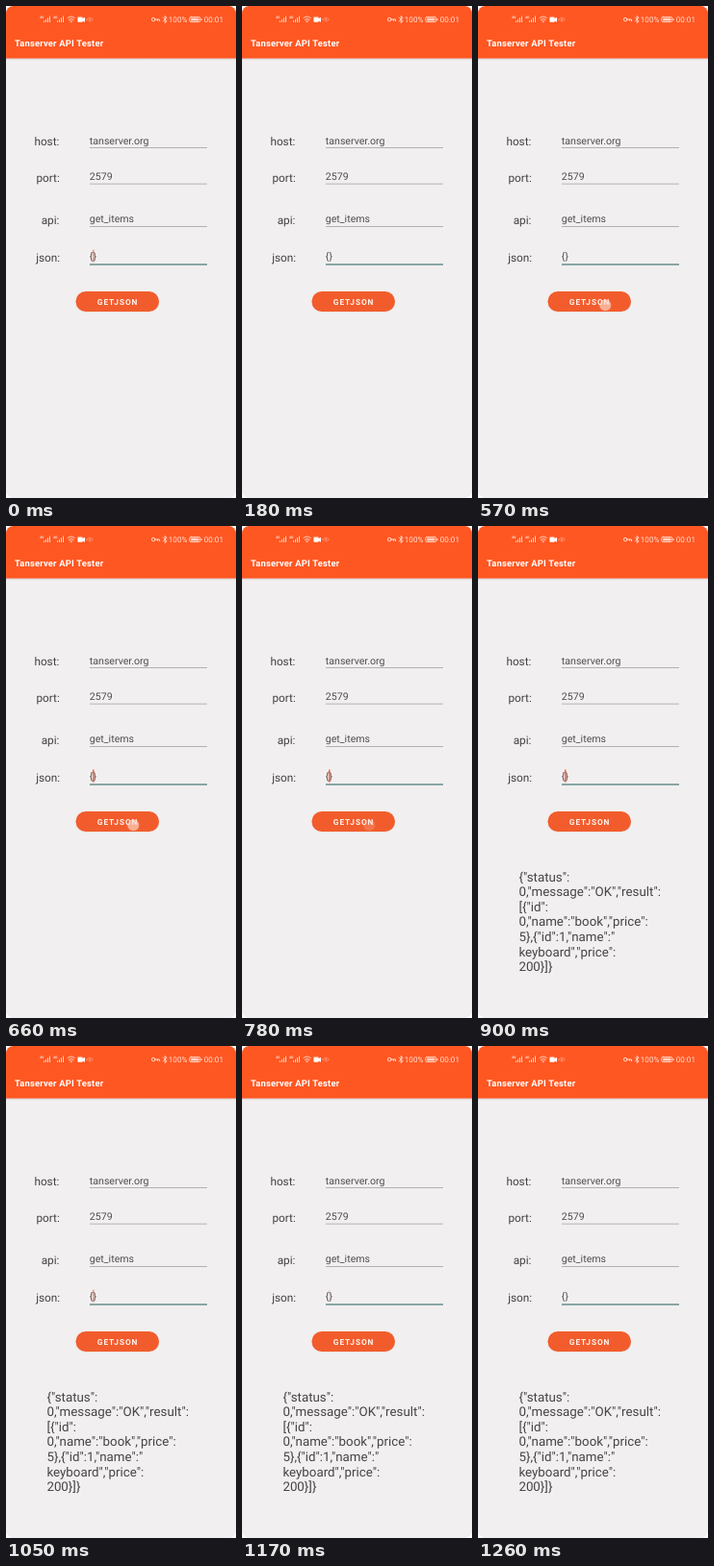
Recreate the animation shown at these times as an HTML page. Size 239 by 512 pixels, loop 1.29 s.

```html
<!DOCTYPE html>
<html lang="en">
<head>
<meta charset="utf-8">
<title>API Tester</title>
<style>
  html, body { margin: 0; width: 100%; height: 100%; overflow: hidden; background: #fff; }
  svg { display: block; width: 239px; height: 512px; font-family: Roboto, sans-serif; }
  text { white-space: pre; text-rendering: geometricPrecision; }
  .bar { fill: #fff; }
  .title { font-size: 9.4px; font-weight: 600; letter-spacing: .2px; }
  .status { font-size: 8.1px; fill: #ffe0d5; }
  .label { font-size: 11.8px; fill: #434142; }
  .value { font-size: 10.6px; fill: #504e4f; }
  .button { font-size: 8.3px; font-weight: 600; letter-spacing: .95px; fill: #fff3ee; }
  .result { font-size: 13.33px; fill: #464445; }
  .icon { fill: none; stroke: #ffe0d5; stroke-width: .9; stroke-linecap: round; }
</style>
</head>
<body>
<svg viewBox="0 0 239 512">
  <defs>
    <clipPath id="screen"><rect width="239" height="512" rx="7.5"/></clipPath>
    <linearGradient id="shade" x2="0" y2="1">
      <stop stop-color="#b9a7a2" stop-opacity=".6"/>
      <stop offset="1" stop-color="#f1eff0" stop-opacity="0"/>
    </linearGradient>
    <g id="signal">
      <path class="icon" d="M4.5 16.6v-1M6.5 16.6v-2.4M8.5 16.6v-4M10.5 16.6v-5.6"/>
      <text x="0" y="13.2" font-size="3.6" font-weight="700" fill="#ffe0d5">4G</text>
    </g>
  </defs>
  <g clip-path="url(#screen)">
    <rect width="239" height="512" fill="#f1eff0"/>
    <rect width="239" height="54.6" fill="#ff5722"/>
    <rect y="54.6" width="239" height="2.4" fill="url(#shade)"/>

    <use href="#signal" x="35"/>
    <use href="#signal" x="49"/>
    <path class="icon" d="M64 12.4q3.7-3 7.4 0M65.3 14.2q2.4-1.9 4.8 0M66.6 15.8q1.1-.8 2.2 0M67.7 16.8v.1"/>
    <path class="bar" d="M74.5 11.5h5v1.5l2.5-1.3v5l-2.5-1.3v1.4h-5z"/>
    <g opacity=".4">
      <path class="icon" d="M84 14q3.2-4 6.4 0q-3.2 4-6.4 0z"/>
      <circle cx="87.2" cy="14" r="1" fill="#fff"/>
    </g>
    <path class="icon" d="M155.2 14h4.4v1.7M157.6 14v1.4"/>
    <circle class="icon" cx="153.2" cy="14" r="1.8"/>
    <path class="icon" d="M163.3 12l3.8 3.8-1.9 1.8v-7.2l1.9 1.8-3.8 3.8"/>
    <text class="status" x="168.8" y="16.9">100%</text>
    <rect class="icon" x="190.8" y="11.4" width="11" height="5.2" rx="1.4"/>
    <rect x="192.1" y="12.6" width="8.4" height="2.8" rx=".5" fill="#ffd2c2"/>
    <path class="icon" d="M203.1 13.3v1.4"/>
    <text class="status" x="205.8" y="16.9">00:01</text>
    <text class="bar title" x="9" y="42.2">Tanserver API Tester</text>

    <g id="form"></g>
    <rect id="cursor" x="90.1" y="253.5" width="1.5" height="13" fill="#ee6440"/>

    <rect x="72.5" y="298" width="86.5" height="20.5" rx="10.25" fill="#c9a598" opacity=".35"/>
    <rect x="72.5" y="297" width="86.5" height="21" rx="10.5" fill="#f25c2c"/>
    <text class="button" x="94.8" y="310.6">GETJSON</text>
    <circle id="touch" cx="132.3" cy="311.3" r="6" fill="#ffd9cb"/>
    <g id="result"></g>
  </g>
</svg>
<script>
  const LOOP = 1290;
  const $ = id => document.getElementById(id);

  function add(parent, tag, attrs, content = '') {
    const el = document.createElementNS('http://www.w3.org/2000/svg', tag);
    for (const key in attrs) el.setAttribute(key, attrs[key]);
    el.textContent = content;
    parent.append(el);
  }

  // label, label x, label baseline, value, value baseline, line y
  const fields = [
    ['host:', 29.4, 144.8, 'tanserver.org', 143.6, 147.6],
    ['port:', 31.4, 182.8, '2579', 180.8, 185.1],
    ['api:', 36.7, 227.4, 'get_items', 225.2, 229.6],
    ['json:', 31.2, 266, '{}', 264.4, 269]
  ];
  fields.forEach(([label, x, y, value, base, line], i) => {
    const active = i === 3, h = active ? 1.5 : 0.8;
    add($('form'), 'text', { class: 'label', x, y }, label);
    add($('form'), 'text', { class: 'value', x: 86.8, y: base }, value);
    add($('form'), 'rect', {
      x: 87, y: line - h / 2, width: 122, height: h,
      fill: active ? '#688f8c' : '#a3a1a2'
    });
  });

  const lines = [
    '{"status":',
    '0,"message":"OK","result":',
    '[{"id":',
    '0,"name":"book","price":',
    '5},{"id":1,"name":"',
    'keyboard","price":',
    '200}]}'
  ];
  lines.forEach((line, i) =>
    add($('result'), 'text', { class: 'result', x: 42.4, y: 369.5 + i * 15.6 }, line));

  // Each step is [start ms, opacity], held until the next one.
  function play(id, steps) {
    const frames = steps.map(([ms, opacity]) => ({ offset: ms / LOOP, opacity, easing: 'step-end' }));
    frames.push({ offset: 1, opacity: steps[steps.length - 1][1] });
    const anim = $(id).animate(frames, { duration: LOOP, iterations: Infinity });
    anim.startTime = document.timeline.currentTime;
  }

  play('cursor', [[0, .6], [30, .45], [60, .3], [90, .15], [120, 0],
    [600, .35], [630, .7], [660, 1], [1020, .8], [1050, .6], [1080, .3], [1170, .15], [1200, 0]]);
  play('touch', [[0, 0], [570, .65], [690, .5], [720, .38], [750, .28], [780, .2], [810, .1], [840, 0]]);
  play('result', [[0, 0], [840, 1]]);
</script>
</body>
</html>
```
